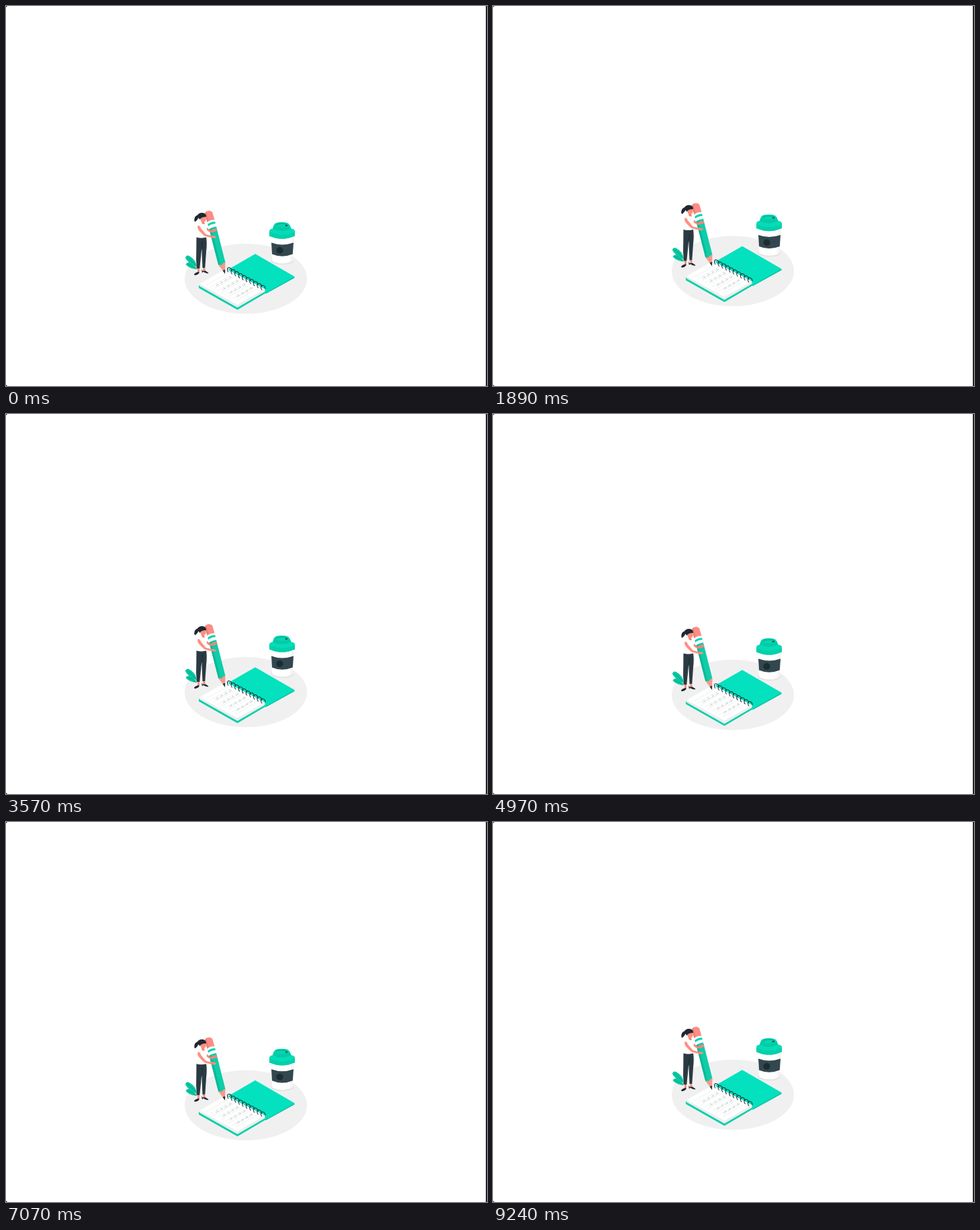
An HTML page that plays this animation: 716 px wide and 566 px high, repeating every 9310 ms.

```html
<!DOCTYPE html>
<html lang="en">
<head>
<meta charset="utf-8">
<title>Writing in a notebook</title>
<style>
  html, body { margin: 0; width: 100%; height: 100%; overflow: hidden; background: #fff; }
  svg { display: block; width: 716px; height: 566px; }
</style>
</head>
<body>
<svg viewBox="0 0 716 566">
  <g id="scene">
    <ellipse cx="357" cy="406.3" rx="91" ry="52.3" fill="#f0f0f0"/>

    <g id="plant" fill="#08c9a3">
      <path d="M284 388C276 386 269 380 267 375Q267.500 371.500 271 371.500C278 374 283 381 284 388Z"/>
      <path d="M284 392C276 391.500 270 388.500 267.500 384.500Q269 381.500 273 382Q280 384 284 392Z"/>
      <path d="M270 374.500Q277.500 379 284 390M270.500 384.500Q278 386.500 284 392" fill="none" stroke="#0b8f78" stroke-width=".7"/>
    </g>

    <g id="cup">
      <ellipse cx="411.500" cy="379.500" rx="17" ry="5.500" fill="#e4e4e4"/>
      <path d="M393.500 340H429.500L426.500 380Q411 387 396.500 380Z" fill="#fff"/>
      <path d="M424.500 346L429 344L426.500 380L422.500 381.500Z" fill="#f4f4f4"/>
      <path d="M395 352.500Q411 358.500 428 352.500L426.800 369.500Q411 376 396 369.500Z" fill="#33474f"/>
      <circle cx="407.500" cy="364" r="5" fill="#1c2c33"/>
      <path d="M392 335Q392.500 332 397 331.500L399 326Q400 322 410.500 322Q421 322 422 326L424.500 331.500Q429.500 332 430 335V342.500Q411 351 392 342.500Z" fill="#04dcb7"/>
      <path d="M392 336Q411 345.500 430 336V342.500Q411 351 392 342.500Z" fill="#04d0ab"/>
      <path d="M397 331.500L399 326Q410 333.500 422 326L424.500 331.500Q410 338.500 397 331.500Z" fill="#04cba7"/>
      <ellipse cx="410.500" cy="326" rx="9.500" ry="2.900" fill="#06b896"/>
      <ellipse cx="410.500" cy="327" rx="8.300" ry="2.200" fill="#08d5b0"/>
      <ellipse cx="417.300" cy="327" rx="1.800" ry="1" fill="#164b46"/>
    </g>

    <g id="notebook">
      <path d="M328 395L371 370L429.500 403.500V405L387 428.500Z" fill="#04c5a2"/>
      <path d="M328 394L371 369.200L429.500 403L386 427.500Z" fill="#03e1bf"/>
      <path d="M287 416.500L328 394L386 425V428L344.500 452.500L287 420Z" fill="#05cfab"/>
      <path d="M288 413.500L344.500 444L385.500 420.500V425.500L344.500 449.300L288 417.300Z" fill="#ebeeed"/>
      <path d="M288 414L327.500 391.500L385.500 421.500L344.500 445Z" fill="#fff"/>
      <path id="rules" fill="none" stroke="#e2e6e6" stroke-width=".6"/>
      <path id="writing" fill="none" stroke="#b3bdbf" stroke-width=".7"/>
      <path id="rings" fill="none" stroke="#263238" stroke-width="1.100"/>
    </g>

    <g id="pencil">
      <path d="M296 309Q296.500 305.500 302 305Q306 305 307.300 307.500L310.500 318.500Q305 319 299.500 322Z" fill="#fb8d86"/>
      <path d="M296 309L299.500 322L302 320.500L298.300 307Z" fill="#f27d78"/>
      <path d="M299.500 322Q304 318 310.500 318.500L313 328.500Q307 329 302.500 332.500Z" fill="#f4fbfa"/>
      <path d="M300.300 325Q304.500 321.500 311.200 321.300L312 324Q305.500 324.500 301 328Z" fill="#0bd3ac"/>
      <path d="M302.500 332.500Q307 329 313 328.500L326.500 382L321 387.500L316.300 386Z" fill="#0fcda8"/>
      <path d="M302.500 332.500L305.500 330.700L319.500 386.500L316.300 386Z" fill="#0aba98"/>
      <path d="M316.300 386Q318.500 384.500 320.500 386.500Q323 382 326.500 382L326 398.500Z" fill="#f29b8e"/>
      <path d="M322.500 394L326.300 392.500L326 399Z" fill="#263238"/>
    </g>

    <g id="woman">
      <path d="M285 389L288 390V396L285 397ZM293 388H295.800L297 395L293.500 396Z" fill="#ff8f80"/>
      <path d="M280 399.500Q283 396 287.500 396V398Q284.500 401.500 280.500 400.800ZM291 392.500L292.500 394.500L297 394.500Q301.500 397 301.500 398Q298 399 293.500 395.800L292 397.500Z" fill="#20262e"/>
      <path d="M283.500 344Q291 346.500 298 344Q299.500 353 298 366L296.300 390H292.500L291.300 361L288.300 391H284Q282.500 376 283.300 363Z" fill="#2b3a42"/>
      <path d="M291.300 362L292.500 350" stroke="#1b272d" stroke-width=".7"/>
      <path d="M285 325Q290 320.500 296.500 323L299 328L298 344.500Q290 346.500 283.500 344.500L285 335Z" fill="#fdfdfd"/>
      <path d="M290.500 320H294.500L296 325L292 324.500Z" fill="#f47f75"/>
      <path d="M285.500 327Q288.500 326.500 290 331L297.500 340L305 342Q312.500 341.500 313.300 344.500Q310 346.800 305 345L295.500 342.500Q287.500 336 285.200 331Z" fill="#ff8f80"/>
      <path d="M299.500 330L304 334.500L311 331.500Q315.500 332 314 335L306 337.500Q300.500 336 298.500 333Z" fill="#f9857a"/>
      <ellipse cx="293.500" cy="316.500" rx="4.300" ry="5.300" fill="#ff8f80"/>
      <path d="M298 312.500Q297 308 291.500 308Q287 308.300 285 311.500Q280.500 313 280.300 318.500Q280 320.500 281.500 321.500Q285 319 286.500 315.500L288.500 318Q290.500 314 298 314Z" fill="#1e2831"/>
    </g>
  </g>

  <path d="M715.200 0V566" stroke="#000" stroke-width="1.600"/>
  <path d="M0 0H2L0 2ZM0 566H2L0 564Z" fill="#333"/>
</svg>
<script>
const LOOP = 9310, STEP = 70;
const $ = id => document.getElementById(id);
const repeat = (n, make) => Array.from({ length: n }, (_, i) => make(i)).join('');

// Page point: u runs along the spiral, v from the spiral to the outer edge.
const page = (u, v) => `${(327.5 + 58 * u - 40 * v).toFixed(1)} ${(391.5 + 30 * u + 23 * v).toFixed(1)}`;

$('rules').setAttribute('d', repeat(9, i => {
  const u = 0.12 + i * 0.095;
  return `M${page(u, 0.13)}L${page(u, 0.91)}`;
}));
$('writing').setAttribute('d', repeat(4, row => repeat(4, word => {
  const u = 0.27 + row * 0.18, v = 0.18 + word * 0.16;
  return `M${page(u, v)}L${page(u, v + 0.12)}M${page(u, v + 0.03)}L${page(u - 0.05, v + 0.02)}`;
})));
$('rings').setAttribute('d', repeat(10, i => {
  const x = 331 + i * 5.55, y = 396.5 + i * 2.95;
  return `M${x} ${y}c-3 -4 -1.500 -7.500 1.700 -6.800c2.300 .6 3.400 2.800 3.300 5.200`;
}));

const swing = u => (1 - Math.cos(Math.PI * u)) / 2;
const drop = u => 1 - (1 - u) ** 1.82;

// [time, vertical offset, easing towards the next entry]
const path = [
  [0, 0, swing], [1190, -232, drop], [2310, 33, swing], [3290, 6.8, swing],
  [4480, 16, swing], [5740, 4.2, swing], [6020, 4.2, swing], [7105, 15.7, swing],
  [8120, -2, swing], [8330, -2.5, swing], [9240, 0, swing], [LOOP, 0, swing]
];

function offsetAt(t) {
  if (t < 1190) return 0;
  const i = path.findIndex(p => p[0] > t);
  const [t0, y0, ease] = path[i - 1], [t1, y1] = path[i];
  return y0 + (y1 - y0) * ease((t - t0) / (t1 - t0));
}

const start = performance.now();
function draw(now) {
  const t = Math.max(0, now - start) % LOOP;
  const y = offsetAt(Math.floor(t / STEP) * STEP);
  $('scene').setAttribute('transform', `translate(0 ${y.toFixed(2)})`);
  requestAnimationFrame(draw);
}
draw(start);
</script>
</body>
</html>
```
